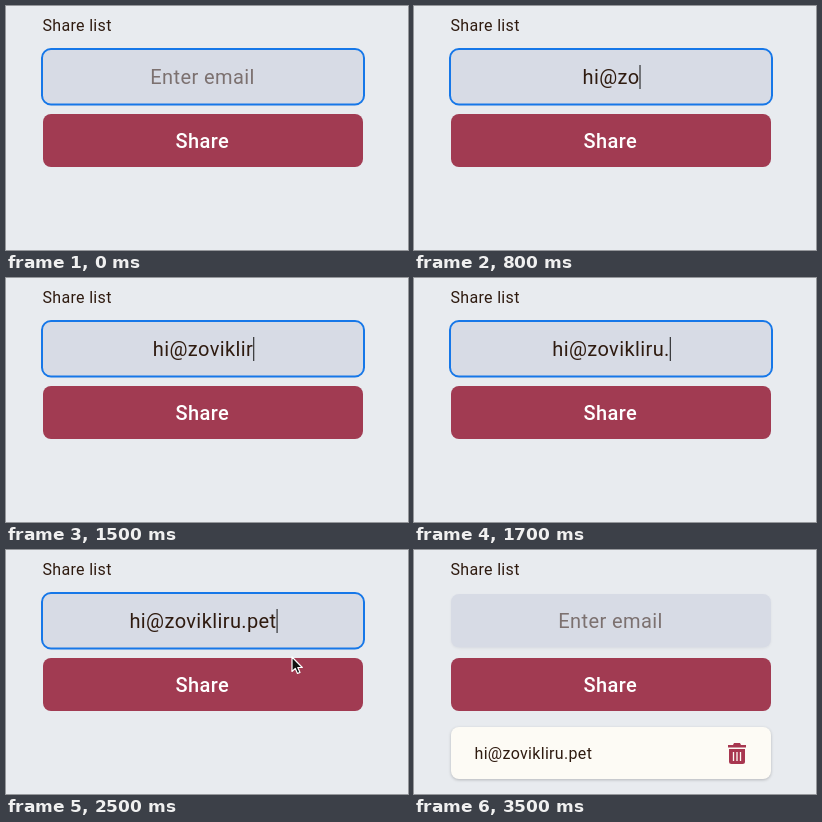
These frames come from a looping animation (402 px wide and 244 px high, 8700 ms). An HTML page:

```html
<!DOCTYPE html>
<html lang="en">
<head>
<meta charset="utf-8">
<title>Share list</title>
<style>
  html, body { margin: 0; width: 100%; height: 100%; overflow: hidden; background: #e8ebef; }
  svg { display: block; width: 100%; height: 100%; }
  text { font: 400 16px Roboto, sans-serif; letter-spacing: .02em; fill: #2f1b10; }
  .large { font-size: 20px; text-anchor: middle; }
  #placeholder { fill: #7c7170; }
  #share { font-weight: 500; fill: #fff; }
  #field { filter: drop-shadow(0 1px 1px #0000000d); }
  #card { fill: #fdfbf5; filter: drop-shadow(0 1px 1.5px #00000038); }
</style>
</head>
<body>
<svg viewBox="0 0 402 244">
  <rect width="402" height="244" fill="#e8ebef"/>
  <text x="36.5" y="25">Share list</text>

  <rect id="field" x="37" y="44" width="320" height="53.5" rx="8" fill="#d7dbe5"/>
  <rect id="ring" x="36" y="43" width="322" height="55.5" rx="9" fill="none" stroke="#1677e8" stroke-width="2"/>
  <text id="placeholder" class="large" x="196.5" y="78">Enter email</text>
  <text id="typed" class="large" x="197" y="78"></text>
  <rect id="caret" y="59" width="1" height="24" fill="#111"/>

  <rect x="37" y="108" width="320" height="53" rx="8" fill="#a13b52"/>
  <text id="share" class="large" x="196.3" y="142">Share</text>

  <g id="item">
    <rect id="card" x="37" y="177" width="320" height="52" rx="8"/>
    <text id="saved" x="60.5" y="209"></text>
    <g fill="#a83750">
      <path d="M314 195h5l1-2h6l1 2h5v2.5h-18z"/>
      <path d="M315 199h16v12.5q0 2.5-2.5 2.5h-11q-2.5 0-2.5-2.5z"/>
      <path d="M319.5 202v9M323 202v9M326.5 202v9" stroke="#fdfbf5" stroke-width="1.3"/>
    </g>
  </g>

  <path id="pointer" d="M0 0V14.5L3.3 11.4 5.5 16.5 8 15.4 5.8 10.5H10.3Z" fill="#111" stroke="#fff" stroke-width="1.2" stroke-linejoin="round"/>
</svg>
<script>
  const LOOP = 8700;
  const STEP = 100;
  const EMAIL = "hi@zovikliru.pet";
  const KEY_TIMES = [300, 500, 600, 700, 800, 900, 1000, 1100,
                     1200, 1300, 1500, 1600, 1700, 1800, 1900, 2100];
  const PRESS = 2800, SUBMIT = 2900;

  const el = id => document.getElementById(id);
  const [ring, placeholder, typed, caret, item, pointer] =
    ["ring", "placeholder", "typed", "caret", "item", "pointer"].map(el);
  const show = (node, visible) => node.setAttribute("visibility", visible ? "visible" : "hidden");
  const progress = (t, from, to) => Math.min(1, Math.max(0, (t - from) / (to - from)));
  const easeOut = p => 1 - (1 - p) ** 3;

  el("saved").textContent = EMAIL;

  function render(t) {
    const count = t < SUBMIT ? KEY_TIMES.filter(time => time <= t).length : 0;
    typed.textContent = EMAIL.slice(0, count);
    show(placeholder, count === 0);
    show(ring, t < PRESS);
    show(caret, t >= 600 && t < 2600);
    caret.setAttribute("x", 197 + typed.getComputedTextLength() / 2);

    item.setAttribute("opacity", easeOut(progress(t, SUBMIT - STEP, 3300)));
    show(item, t >= SUBMIT);

    const move = easeOut(progress(t, 2500, 2700));
    pointer.setAttribute("transform", `translate(${286 + 9 * move} ${107 + 8 * move})`);
    show(pointer, t >= 2500 && t < 3500);
  }

  // The screen updates ten times a second.
  function tick() {
    render(Math.floor(performance.now() % LOOP / STEP) * STEP);
    requestAnimationFrame(tick);
  }
  tick();
</script>
</body>
</html>
```
